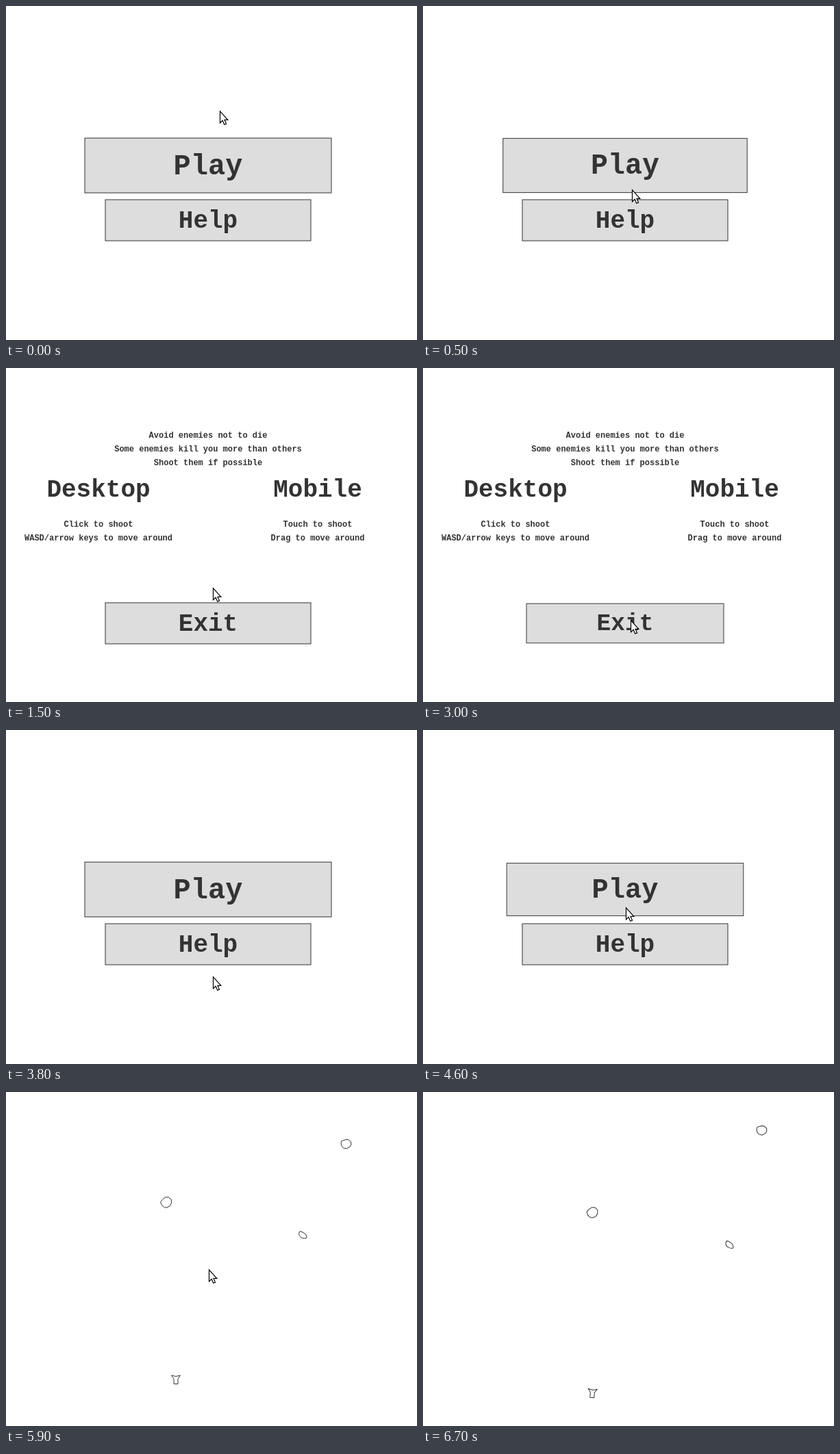
Recreate the animation shown at these times as an HTML page with a canvas. Size 600 by 488 pixels, loop 6.8 s.

```html
<!DOCTYPE html>
<html lang="en">
<head>
<meta charset="utf-8">
<title>Menu and drifting rocks</title>
<style>
  html, body { margin: 0; width: 100%; height: 100%; overflow: hidden; background: #fff; }
  canvas { display: block; }
</style>
</head>
<body>
<canvas id="stage" width="600" height="488"></canvas>
<script>
const ctx = document.getElementById('stage').getContext('2d');
const LOOP = 6800, TICK = 100, CENTER = 295;
const INK = '#333', FACE = '#ddd';
const FONT = '"Liberation Mono", "Courier New", monospace';
const HOVER_SCALE = 0.99, PRESS_SCALE = 0.96;

const play = { label: 'Play', y: 233, w: 360, h: 80, size: 42 };
const help = { label: 'Help', y: 313, w: 300, h: 60, size: 36 };
const exit = { ...help, label: 'Exit', y: 373 };

const scenes = [
  { from: 0, press: 1000, buttons: [play, help] },
  { from: 1500, press: 3000, buttons: [exit], paint: drawGuide },
  { from: 3500, press: 4600, buttons: [play, help] },
  { from: 5000, buttons: [], paint: drawSpace }
];

const pointerStart = { x: 312, y: 153 };
const pointerMoves = [
  { from: 0, to: 800, x: 302, y: 321 },
  { from: 1900, to: 2200, x: 305, y: 368 },
  { from: 2700, to: 2800, x: 303, y: 368 },
  { from: 3700, to: 4300, x: 296, y: 259 }
];
const POINTER_GONE = 6400;
const arrow = [[0, 0], [0, 17], [3.7, 13.5], [6.2, 19.5], [9, 18.3], [6.5, 12.5], [11.3, 12.5]];

// Everything in space drifts at one speed; positions hold at DRIFT_TIME
const DRIFT_TIME = 5900, SPEED = 25, SPIN = 0.1;
const halfShip = [[6.5, -6], [3, -1], [3, 6.5]];
const ship = [...halfShip, ...halfShip.map(([x, y]) => [-x, y]).reverse(), [0, -4.5]];
const drifters = [
  { x: 496.5, y: 76, heading: -96, shape: rockShape(8.5, 7, 0, 5) },
  { x: 234, y: 161.5, heading: 48, shape: rockShape(8.5, 8, -40, 9) },
  { x: 433, y: 209, heading: 45, shape: rockShape(7, 4.2, 42, 3) },
  { x: 248, y: 420, heading: 92, shape: ship }
];

function radians(degrees) {
  return degrees * Math.PI / 180;
}

function seededRandom(seed) {
  return () => (seed = seed * 16807 % 2147483647) / 2147483647;
}

// Ellipse with a jittered rim
function rockShape(rx, ry, tilt, seed, corners = 10) {
  const random = seededRandom(seed * 7919);
  const cos = Math.cos(radians(tilt)), sin = Math.sin(radians(tilt));
  return Array.from({ length: corners }, (_, i) => {
    const angle = (i + random() * 0.4) / corners * 2 * Math.PI;
    const reach = 0.83 + 0.2 * random();
    const x = rx * reach * Math.cos(angle), y = ry * reach * Math.sin(angle);
    return [x * cos - y * sin, x * sin + y * cos];
  });
}

function tracePath(points) {
  ctx.beginPath();
  points.forEach(([x, y]) => ctx.lineTo(x, y));
  ctx.closePath();
}

function write(text, x, y, size) {
  ctx.fillStyle = INK;
  ctx.font = `bold ${size}px ${FONT}`;
  ctx.fillText(text, x, y + size * 0.3);
}

function writeLines(x, y, ...lines) {
  lines.forEach((line, i) => write(line, x, y + i * 20, 12));
}

function drawGuide() {
  writeLines(CENTER, 98, 'Avoid enemies not to die',
    'Some enemies kill you more than others', 'Shoot them if possible');
  write('Desktop', CENTER - 160, 177, 36);
  writeLines(CENTER - 160, 228, 'Click to shoot', 'WASD/arrow keys to move around');
  write('Mobile', CENTER + 160, 177, 36);
  writeLines(CENTER + 160, 228, 'Touch to shoot', 'Drag to move around');
}

function drawSpace(t) {
  const seconds = (t - DRIFT_TIME) / 1000;
  for (const { x, y, heading, shape } of drifters) {
    const angle = radians(heading);
    ctx.save();
    ctx.translate(x + SPEED * seconds * Math.cos(angle), y + SPEED * seconds * Math.sin(angle));
    ctx.rotate(SPIN * seconds);
    tracePath(shape);
    ctx.stroke();
    ctx.restore();
  }
}

function drawButton({ label, y, w, h, size }, pointer, pressed) {
  const hover = Math.abs(pointer.x - CENTER) < w / 2 && Math.abs(pointer.y - y) < h / 2;
  const scale = !hover ? 1 : pressed ? PRESS_SCALE : HOVER_SCALE;
  ctx.save();
  ctx.translate(CENTER, y);
  ctx.scale(scale, scale);
  ctx.fillStyle = FACE;
  ctx.fillRect(-w / 2, -h / 2, w, h);
  ctx.strokeRect(-w / 2, -h / 2, w, h);
  write(label, 0, 0, size);
  ctx.restore();
}

function pointerAt(t) {
  let { x, y } = pointerStart;
  for (const move of pointerMoves) {
    const k = Math.min(1, Math.max(0, (t - move.from) / (move.to - move.from)));
    const eased = k * k * (3 - 2 * k);
    x += (move.x - x) * eased;
    y += (move.y - y) * eased;
  }
  return { x: Math.round(x), y: Math.round(y) };
}

function drawPointer({ x, y }) {
  ctx.save();
  ctx.translate(x + 0.5, y + 0.8);
  tracePath(arrow);
  ctx.fillStyle = '#fff';
  ctx.fill();
  ctx.strokeStyle = '#000';
  ctx.lineWidth = 1.2;
  ctx.stroke();
  ctx.restore();
}

function draw(t) {
  const scene = scenes.filter(s => s.from <= t).pop();
  const pointer = pointerAt(t);
  ctx.fillStyle = '#fff';
  ctx.fillRect(0, 0, 600, 488);
  ctx.textAlign = 'center';
  ctx.strokeStyle = INK;
  ctx.lineWidth = 1;
  scene.paint?.(t);
  scene.buttons.forEach(button => drawButton(button, pointer, t >= scene.press));
  if (t < POINTER_GONE) drawPointer(pointer);
}

const start = performance.now();
function frame() {
  const elapsed = (performance.now() - start) % LOOP;
  draw(Math.floor(elapsed / TICK) * TICK);
  requestAnimationFrame(frame);
}
frame();
</script>
</body>
</html>
```
